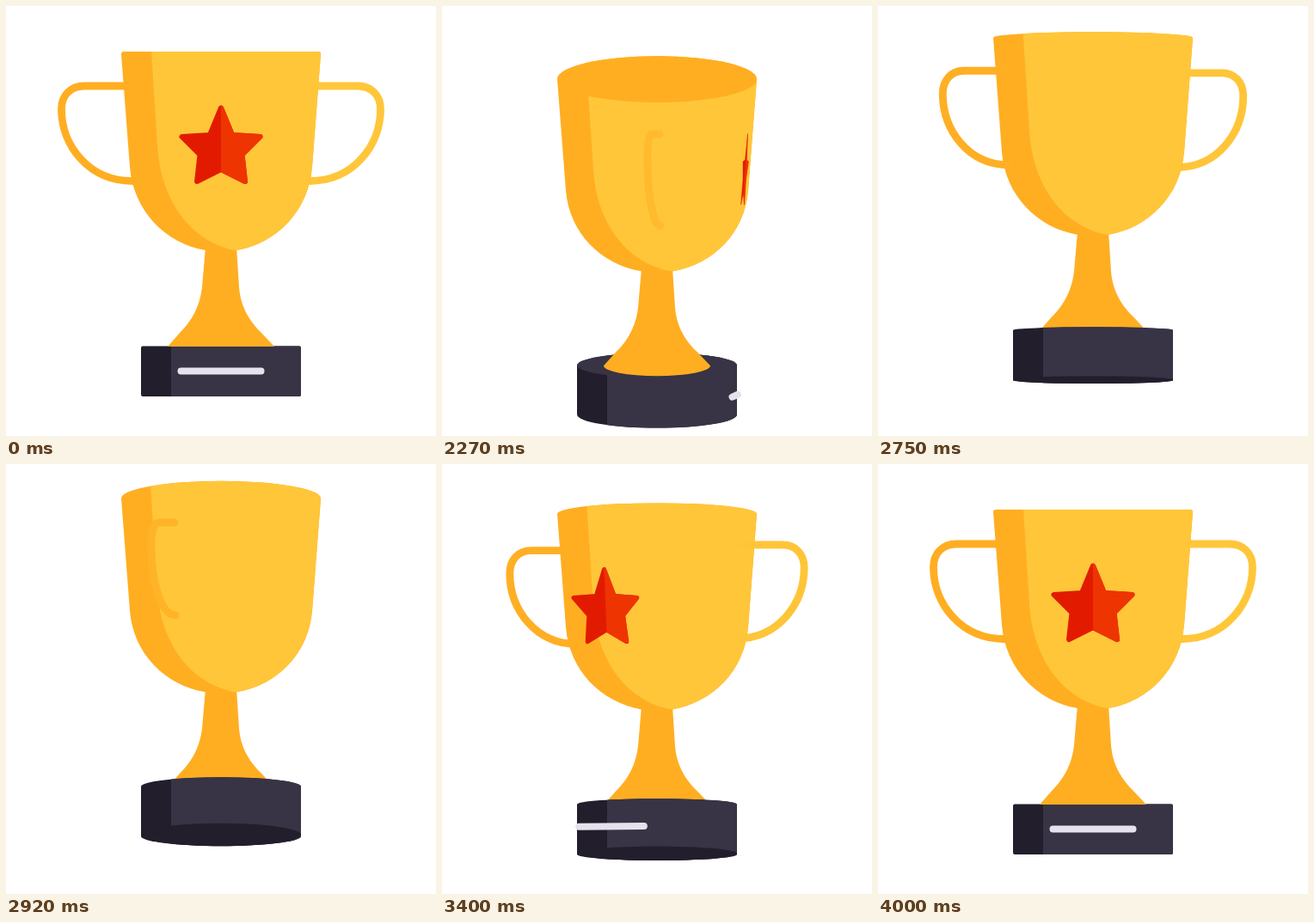
An HTML page that plays this animation: 500x500 px, repeating every 4.02 s.

```html
<!DOCTYPE html>
<html lang="en">
<head>
<meta charset="utf-8">
<title>Turning trophy</title>
<style>
  html, body { margin: 0; width: 100%; height: 100%; overflow: hidden; background: #fff; }
  svg { display: block; width: 100vw; height: 100vh; }
</style>
</head>
<body>
<svg id="stage" viewBox="0 0 500 500">
  <defs>
    <clipPath id="bowlClip"><path id="bowlShape"/></clipPath>
    <clipPath id="baseClip"><path id="baseShape"/></clipPath>
    <clipPath id="starClip"><polygon id="starHalf"/></clipPath>
  </defs>
  <g id="back"></g>
  <path id="stemBack" fill="#ffae22"/>
  <g clip-path="url(#baseClip)">
    <rect width="500" height="500" fill="#221e2b"/>
    <rect x="192" width="308" height="500" fill="#383445"/>
    <ellipse id="baseTop" cx="250" rx="93" fill="#383445"/>
    <ellipse id="baseUnder" cx="250" rx="93" fill="#221e2b"/>
  </g>
  <polyline id="label" fill="none" stroke="#e6e1ec" stroke-width="8" stroke-linecap="round"/>
  <path id="stemFront" fill="#ffae22"/>
  <g clip-path="url(#bowlClip)">
    <rect width="500" height="500" fill="#ffae22"/>
    <path id="bowlLit" fill="#ffc639"/>
    <ellipse id="rim" cx="250" rx="116" fill="#ffae22"/>
  </g>
  <g id="star" stroke-linejoin="round">
    <polygon id="starDark" fill="#e21b00" stroke="#e21b00"/>
    <g clip-path="url(#starClip)"><polygon id="starLit" fill="#ee3400" stroke="#ee3400"/></g>
  </g>
  <g id="front"></g>
</svg>
<script>
const LOOP = 4020, START = 2020, STEP = 25;
const el = Object.fromEntries([...document.querySelectorAll('[id]')].map(e => [e.id, e]));
const rad = deg => deg * Math.PI / 180;
const set = (e, attrs) => { for (const key in attrs) e.setAttribute(key, attrs[key]); };

// Smooth curve through [time, value] points, without overshoot, at rest at the end.
function track(...keys) {
  const slope = keys.slice(1).map((p, i) => (p[1] - keys[i][1]) / (p[0] - keys[i][0]));
  const tangent = keys.map((_, i) => {
    if (i === 0) return slope[0];
    if (i === keys.length - 1) return 0;
    const a = slope[i - 1], b = slope[i];
    return a * b > 0 ? 2 * a * b / (a + b) : 0;
  });
  return t => {
    if (t >= keys[keys.length - 1][0]) return keys[keys.length - 1][1];
    const i = Math.max(0, keys.findIndex(p => p[0] > t) - 1);
    const [t0, v0] = keys[i], [t1, v1] = keys[i + 1];
    const w = t1 - t0, u = (t - t0) / w, r = 1 - u;
    return v0 * (1 + 2 * u) * r * r + v1 * u * u * (3 - 2 * u)
      + w * u * r * (tangent[i] * r - tangent[i + 1] * u);
  };
}

const handleTurn = track([2020, 8], [2270, 91.6], [2745, 198], [3170, 293.7], [3640, 360]);
const decalTurn = track([2020, 1.3], [2270, 86], [2745, 188], [3170, 271], [3640, 360]);
const tiltAt = track([2020, .05], [2270, 1], [2520, .4], [2745, -.25], [3085, -1], [3170, -.96], [3640, 0]);
const dropAt = track([2020, 1], [2270, 24.5], [2520, 8], [2745, -18], [3085, -19], [3170, -16.5], [3600, 13], [3670, 11], [3995, 0]);

const STAR_HALF = [[0, 118.5], [13, 150], [45.5, 152], [24.5, 173], [28, 204], [0, 190]];
const STAR = [...STAR_HALF, ...STAR_HALF.slice(1, -1).reverse().map(([x, y]) => [-x, y])];
const STAR_RIGHT = [[0, 100], [60, 100], [60, 220], [0, 220]];

const handles = [-1, 1].map(side => {
  const path = document.createElementNS('http://www.w3.org/2000/svg', 'path');
  set(path, { fill: 'none', 'stroke-width': 8.8, 'stroke-linecap': 'round' });
  el.back.append(path);
  return { side, path };
});

function drawHandle({ side, path }, turn, tilt, y) {
  const at = rad(turn + 90 * side);
  const reach = Math.sin(at - rad(12) * Math.sin(rad(turn)));
  const z = Math.cos(at), lift = tilt * z * (tilt > 0 ? 25 : 17);
  const p = (u, v) => `${250 + 107 * Math.sin(at) + u * reach} ${y(v) + lift}`;
  const mix = (Math.sin(at) + 1) / 2;
  set(path, {
    d: `M${p(0, 93)}L${p(52, 93)}C${p(68, 93)} ${p(78.5, 104)} ${p(78.5, 120)}`
      + `C${p(78.5, 163)} ${p(46, 203.5)} ${p(-4, 203.5)}`,
    stroke: `rgb(255,${174 + 24 * mix},${34 + 23 * mix})`
  });
  const layer = z > .05 ? el.front : el.back;
  if (path.parentNode !== layer) layer.append(path);
}

// Corners are rounded only while an edge is seen level.
const corner = (radius, tilt) => radius * Math.max(0, 1 - 5 * Math.abs(tilt));

function topEdge(x0, x1, y, ry, r) {
  return `M${x0} ${y + r}Q${x0} ${y} ${x0 + r} ${y}`
    + `A${(x1 - x0) / 2 - r} ${ry} 0 0 1 ${x1 - r} ${y}Q${x1} ${y} ${x1} ${y + r}`;
}

function drawBowl(tilt, y) {
  const top = y(53), ry = 27 * Math.abs(tilt);
  const rightSide = `C315 ${y(276)} 352 ${y(238)} 356 ${y(187)}`;
  set(el.bowlShape, {
    d: topEdge(134, 366, top, ry, corner(3, tilt))
      + `L356 ${y(187)}C352 ${y(238)} 315 ${y(276)} 268 ${y(284)}H232`
      + `C185 ${y(276)} 148 ${y(238)} 144 ${y(187)}Z`
  });
  set(el.bowlLit, {
    d: `M167 ${top - 40}L169 ${top}L176 ${y(162)}C180 ${y(228)} 216 ${y(274)} 266 ${y(284)}H268`
      + `${rightSide}L380 ${y(187)}V${top - 40}Z`
  });
  set(el.rim, { cy: top, ry: tilt > 0 ? ry : 0 });
}

function drawBase(tilt, y) {
  const top = y(395.5), bottom = y(454), size = Math.abs(tilt), r = corner(2, tilt);
  const ryTop = 14.5 * size, ryBottom = 15.5 * size;
  set(el.baseShape, {
    d: topEdge(157, 343, top, ryTop, r)
      + `V${bottom - r}Q343 ${bottom} ${343 - r} ${bottom}`
      + `A${93 - r} ${ryBottom} 0 0 1 ${157 + r} ${bottom}Q157 ${bottom} 157 ${bottom - r}Z`
  });
  set(el.baseTop, { cy: top, ry: tilt > 0 ? ryTop : 0 });
  set(el.baseUnder, { cy: bottom - 2 * size, ry: tilt < 0 ? 18 * size : 0 });

  const foot = y(396);
  const stem = `M232 ${y(280)}L228 ${y(327)}C225 ${y(352)} 214 ${y(368)} 203 ${y(379)}L188 ${foot}`
    + `A62 ${12 * Math.max(0, tilt)} 0 0 0 312 ${foot}`
    + `L296 ${y(379)}C285 ${y(368)} 273 ${y(352)} 271 ${y(327)}L268 ${y(280)}Z`;
  set(el.stemBack, { d: tilt < 0 ? stem : '' });
  set(el.stemFront, { d: tilt < 0 ? '' : stem });
}

// The star and the label are flat plates carried round the axis.
function drawDecals(turn, tilt, y) {
  const sin = Math.sin(rad(turn)), cos = Math.cos(rad(turn));
  const display = cos > 0 ? '' : 'none';

  const onBowl = ([x, v]) => [250 + (106 - .07 * (v - 115)) * sin + x * cos, y(v)].join();
  const points = STAR.map(onBowl).join(' ');
  for (const e of [el.starDark, el.starLit]) set(e, { points, 'stroke-width': 6 * Math.max(0, cos) });
  set(el.starHalf, { points: STAR_RIGHT.map(onBowl).join(' ') });
  el.star.style.display = display;

  const onBase = x => [250 + 91 * sin + x * cos, y(424.5) + tilt * (7 - .03 * x * sin)].join();
  set(el.label, { points: `${onBase(-46.5)} ${onBase(46.5)}` });
  el.label.style.display = display;
}

function render(time) {
  const moving = time >= START;
  const t = START + Math.floor((time - START) / STEP) * STEP;
  const value = curve => moving ? curve(t) : 0;
  const tilt = value(tiltAt), drop = value(dropAt);
  const y = v => 284 + drop + (v - 284) * (1 - (v < 284 ? .033 : .02) * Math.abs(tilt));

  handles.forEach(h => drawHandle(h, value(handleTurn), tilt, y));
  drawBowl(tilt, y);
  drawBase(tilt, y);
  drawDecals(value(decalTurn), tilt, y);
}

const origin = performance.now();
function tick() {
  render((performance.now() - origin) % LOOP);
  requestAnimationFrame(tick);
}
tick();
</script>
</body>
</html>
```
